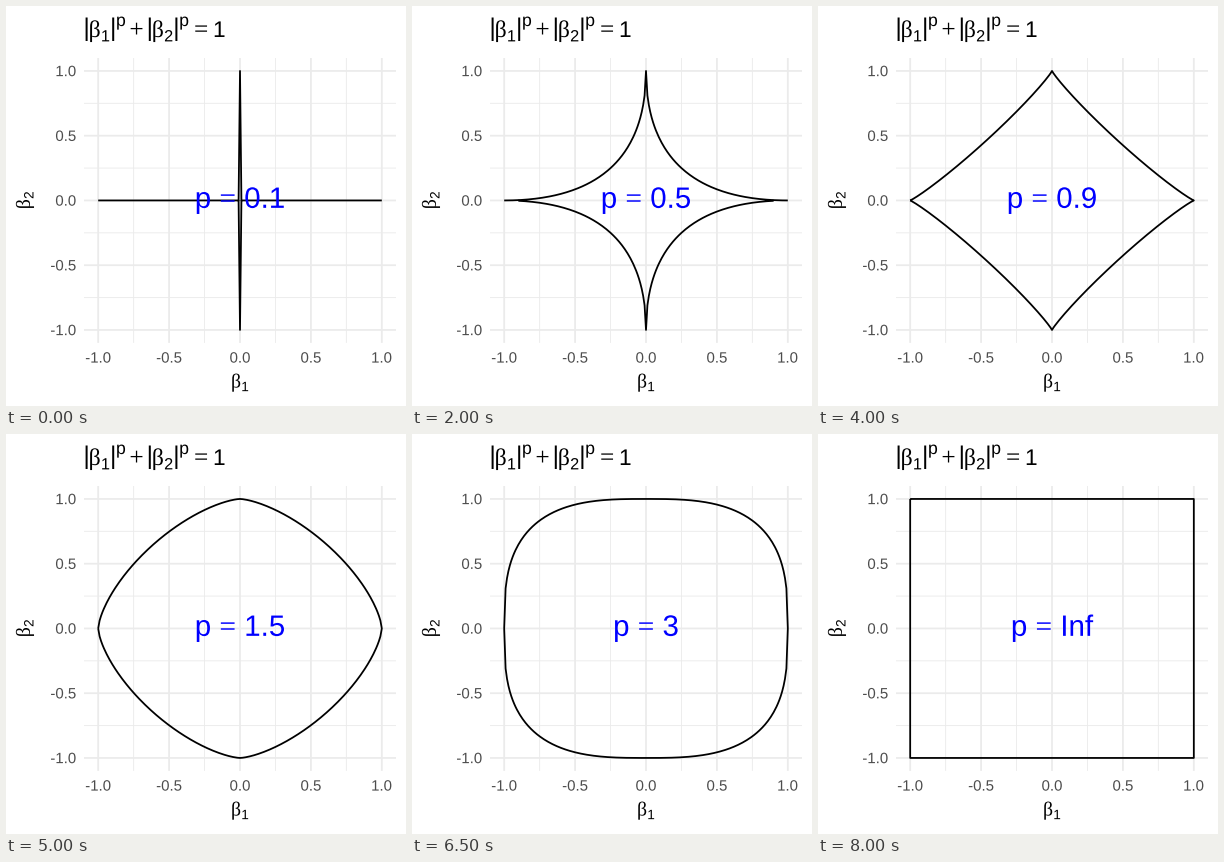
Write a matplotlib script that moves like this. It is 400x400 px and loops after 8500 ms.

```python
import numpy as np
import matplotlib.pyplot as plt
from matplotlib.animation import FuncAnimation
from matplotlib.patches import PathPatch
from matplotlib.path import Path
from matplotlib.textpath import TextPath
from matplotlib.transforms import Affine2D

SIZE = 400
DPI = 100
PX = 72 / DPI                      # points per pixel
SANS, SERIF = "Liberation Sans", "Liberation Serif"

# Panel edges and the pixel scale of the data
LEFT, RIGHT, TOP, BOTTOM = 78, 390, 52, 336.9
CX, CY = (LEFT + RIGHT) / 2, (TOP + BOTTOM) / 2
SX, SY = (RIGHT - LEFT) / 2.2, (BOTTOM - TOP) / 2.2

POWERS = [k / 10 for k in range(1, 11)] + [1.5, 2, 2.5, 3, 5, 10, np.inf]
STEP_MS = 500

fig = plt.figure(figsize=(SIZE / DPI, SIZE / DPI), dpi=DPI, facecolor="white")
ax = fig.add_axes([0, 0, 1, 1])
ax.set_xlim(0, SIZE)
ax.set_ylim(SIZE, 0)
ax.axis("off")


def px(x):
    return CX + SX * x


def py(y):
    return CY - SY * y


def stroke(xs, ys, width, color="black", z=2):
    line, = ax.plot(xs, ys, color=color, lw=width * PX, zorder=z, snap=False,
                    solid_capstyle="butt", solid_joinstyle="round")
    return line


def glyphs(x, y, s, size, font=SANS, align=None, angle=0):
    """Outline of a text on baseline y; align 0.5 centres it, 1 ends it at x."""
    path = TextPath((0, 0), s, size=size, prop={"family": font})
    shift = 0
    if align:
        box = path.get_extents()
        shift = -(box.x0 + align * box.width)
    move = Affine2D().translate(shift, 0).scale(1, -1).rotate_deg(-angle)
    return path.transformed(move.translate(x, y))


def add_text(path, color="black"):
    patch = PathPatch(path, facecolor=color, lw=0, zorder=4, snap=False)
    return ax.add_patch(patch)


def write(*args, color="black", **kwargs):
    return add_text(glyphs(*args, **kwargs), color)


def grid(values, width, z):
    for v in values:
        stroke([px(v)] * 2, [TOP, BOTTOM], width, "#EBEBEB", z)
        stroke([LEFT, RIGHT], [py(v)] * 2, width, "#EBEBEB", z)


def beta(x, y, index, size, angle=0):
    """Beta with a subscript, running right or (at 90 degrees) upwards."""
    step, drop = 0.56 * size, 0.2 * size
    write(x, y, "β", 1.08 * size, SERIF, angle=angle)
    if angle:
        write(x + drop, y - step, index, 0.74 * size, angle=angle)
    else:
        write(x + step, y + drop, index, 0.74 * size)


def draw_title():
    size, base = 22, 31
    for x, index in ((78, "1"), (141.2, "2")):
        for bar in (x + 2.6, x + 29.2):
            stroke([bar, bar], [11.5, 35], 2)
        beta(x + 4.6, base, index, size)
        write(x + 32, 20, "p", 0.8 * size)
    write(123.4, base, "+", 1.15 * size, SERIF)
    write(188, base, "=", 1.15 * size, SERIF)
    write(207, base, "1", 1.03 * size)


def draw_axes():
    grid([-0.75, -0.25, 0.25, 0.75], 0.89, 0)
    grid([-1, -0.5, 0, 0.5, 1], 1.78, 1)
    for v in (-1, -0.5, 0, 0.5, 1):
        label = f"{v:.1f}"
        write(px(v), 356.6, label, 15, align=0.5, color="#4D4D4D")
        write(69.6, py(v) + 5.2, label, 15, align=1, color="#4D4D4D")
    beta(225, 381.5, "1", 18.33)
    beta(23.8, 203.2, "2", 18.33, angle=90)


def unit_curve(p):
    """Outline of |x|^p + |y|^p = 1, sampled evenly in x."""
    x = np.arange(-100, 101) / 100
    y = np.clip(1 - np.abs(x) ** p, 0, 1) ** (1 / p)
    # Where both halves lie on the axis, the upper one is enough.
    off_axis = np.convolve(y > 0.003, [1, 1, 1], "same") > 0
    lower = np.where(off_axis, -y, np.nan)
    xs = np.concatenate([x, x[::-1], x[:1]])
    ys = np.concatenate([y, lower[::-1], y[:1]])
    return px(xs), py(ys)


draw_title()
draw_axes()
curve = stroke([], [], 1.78, z=3)

LABEL = 29.5
label = add_text(Path([(0, 0)]), "#0000FF")


def label_path(p):
    value = "Inf" if np.isinf(p) else f"{p:g}"
    value_width = sum(0.278 if c in ".If" else 0.556 for c in value)
    eq_x = 0.556 + 5 / 18
    value_x = eq_x + 0.564 + 5 / 18
    start = CX - (value_x + value_width) * LABEL / 2
    base = CY + 7.4
    return Path.make_compound_path(
        glyphs(start, base, "p", LABEL),
        glyphs(start + eq_x * LABEL, base, "=", LABEL, SERIF),
        glyphs(start + value_x * LABEL, base, value, LABEL))


def update(i):
    p = POWERS[i]
    label.set_path(label_path(p))
    curve.set_data(*unit_curve(p))
    return [curve, label]


anim = FuncAnimation(fig, update, frames=len(POWERS), interval=STEP_MS,
                     repeat=True, repeat_delay=0)
plt.show()
```
